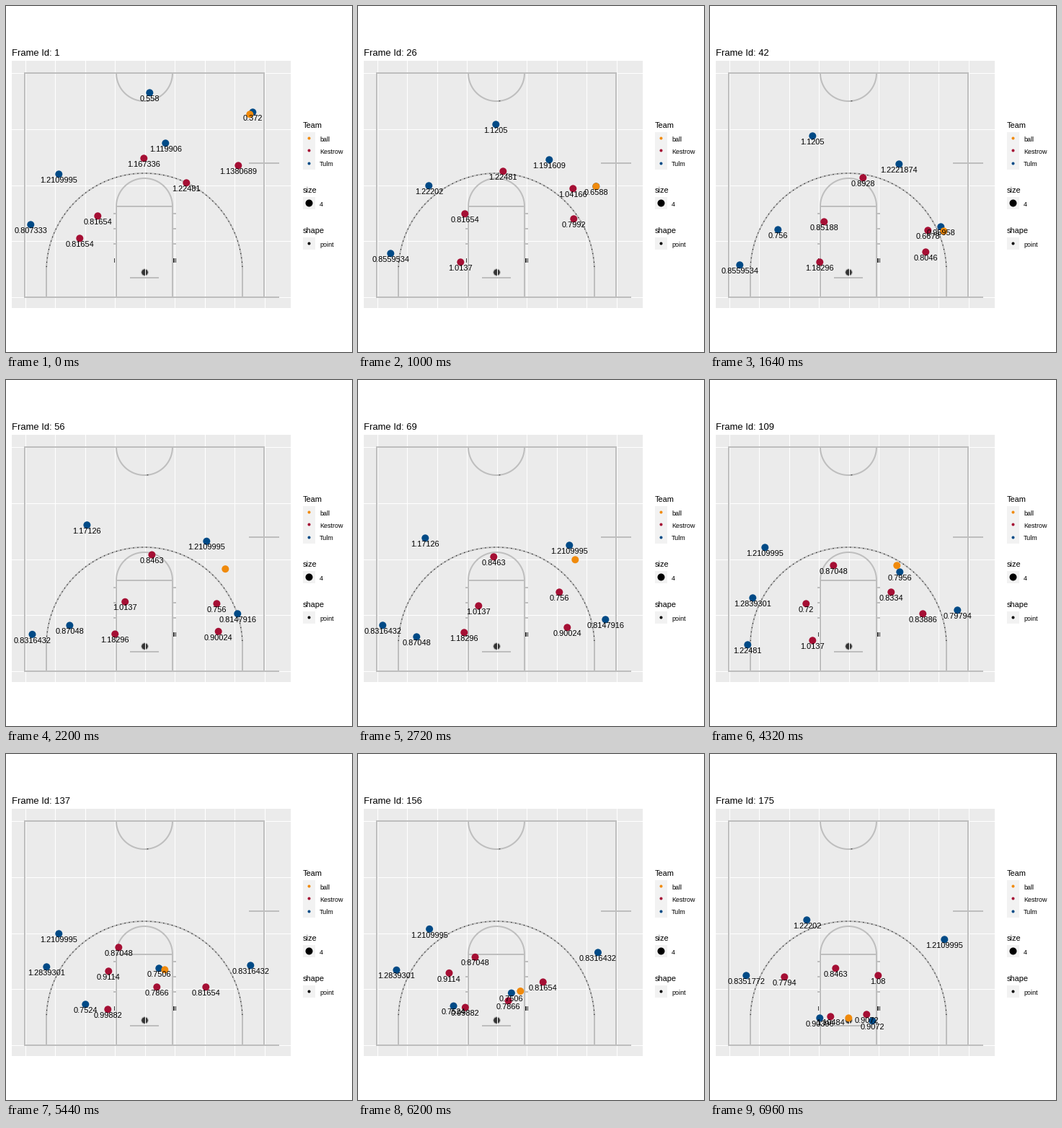
Animation, 480 px wide and 480 px high, one loop 7 s. Source, as a matplotlib script:

```python
import numpy as np
import matplotlib.pyplot as plt
from matplotlib.animation import FuncAnimation
from matplotlib.patches import Rectangle

plt.rcParams["font.family"] = "Liberation Sans"

SIZE, FRAMES, STEP_MS = 480, 175, 40
TIMES = (0, 25, 41, 68, 108, 136, 174)
ORANGE, CRIMSON, NAVY = "#F08A0C", "#A50F34", "#004A86"
PANEL, KEY, COURT, DARK = "#EBEBEB", "#F2F2F2", "#BEBEBE", "#333333"

fig = plt.figure(figsize=(SIZE / 72, SIZE / 72), dpi=72, facecolor="white")
ax = fig.add_axes([0, 0, 1, 1])
ax.set_xlim(0, SIZE)
ax.set_ylim(SIZE, 0)
ax.axis("off")


# ---- motion ----------------------------------------------------------

def smooth_path(points, extra):
    """Cubic Hermite path through timed points, one row per frame."""
    keys = dict(zip(TIMES, points)) | extra
    t = np.array(sorted(keys), float)
    p = np.array([keys[k] for k in sorted(keys)], float)
    m = np.gradient(p, t, axis=0)
    f = np.arange(FRAMES)
    i = np.clip(np.searchsorted(t, f, side="right") - 1, 0, len(t) - 2)
    h = (t[i + 1] - t[i])[:, None]
    u = (f - t[i])[:, None] / h
    return ((2 * u**3 - 3 * u**2 + 1) * p[i] + (u**3 - 2 * u**2 + u) * h * m[i]
            + (3 * u**2 - 2 * u**3) * p[i + 1] + (u**3 - u**2) * h * m[i + 1])


movers = []


def mover(color, values, points, extra=None):
    movers.append((color, values.split(), smooth_path(points, extra or {})))


mover(NAVY, "0.558 1.1205 1.1205 1.17126 1.2109995 1.2109995 1.22202",
      [(199, 120), (191, 164), (142, 180), (93, 219), (76, 232), (73, 249), (134, 230)])
mover(NAVY, "1.119906 1.191609 1.2221874 1.2109995 0.7956 0.7506 0.9072",
      [(221, 190), (265, 213), (262, 219), (293, 229), (263, 266), (212, 297), (225, 370)])
mover(NAVY, "0.372 0.6588 0.95958 0.8147916 0.79794 0.8316432 1.2109995",
      [(342, 147), (330, 250), (320, 306), (343, 332), (343, 319), (339, 293), (325, 257)],
      {54: (320, 323), 80: (346, 330)})
mover(NAVY, "1.2109995 1.22202 0.756 0.87048 1.22481 0.7524 0.90396",
      [(73, 233), (98, 249), (94, 310), (81, 356), (52, 367), (110, 347), (152, 366)],
      {118: (68, 364), 162: (139, 354)})
mover(NAVY, "0.807333 0.8559534 0.8559534 0.8316432 1.2839301 1.2839301 0.8351772",
      [(34, 303), (45, 343), (41, 359), (34, 340), (59, 302), (56, 295), (50, 307)],
      {90: (42, 325)})

mover(CRIMSON, "1.167336 1.22481 0.8928 0.8463 0.87048 0.87048 0.8463",
      [(191, 211), (201, 229), (212, 238), (188, 245), (171, 257), (156, 268), (174, 297)])
mover(CRIMSON, "1.1380689 1.04166 0.6678 0.756 0.8334 0.7866 0.9072",
      [(322, 221), (298, 253), (302, 311), (279, 294), (251, 294), (209, 323), (217, 361)])
mover(CRIMSON, "1.22481 0.7992 0.8046 0.90024 0.83886 0.81654 1.08",
      [(250, 245), (299, 295), (299, 341), (290, 343), (295, 324), (277, 323), (233, 307)])
mover(CRIMSON, "0.81654 0.81654 0.85188 1.0137 0.72 0.9114 0.7794",
      [(127, 291), (148, 288), (158, 299), (167, 313), (133, 310), (142, 301), (103, 309)])
mover(CRIMSON, "0.81654 1.0137 1.18296 1.18296 1.0137 0.99882 1.10484",
      [(102, 322), (142, 355), (152, 355), (147, 350), (142, 361), (141, 354), (167, 364)],
      {122: (141, 363), 162: (154, 354)})

mover(ORANGE, "",
      [(338, 150), (330, 250), (324, 312), (301, 249), (259, 257), (220, 299), (192, 366)],
      {48: (322, 308), 58: (298, 246), 164: (218, 345)})


# ---- court -----------------------------------------------------------

def line(xs, ys, color=COURT, lw=2, **kw):
    ax.plot(xs, ys, color=color, lw=lw, solid_capstyle="butt", **kw)


def straight(x0, y0, x1, y1, **kw):
    line([x0, x1], [y0, y1], antialiased=False, **kw)


def arc(cx, cy, r, start, end, **kw):
    a = np.radians(np.linspace(start, end, 120))
    line(cx + r * np.cos(a), cy + r * np.sin(a), **kw)


def box(x, y, w, h, color):
    ax.add_patch(Rectangle((x, y), w, h, fc=color, lw=0, antialiased=False))


def dot(x, y, r, color, **kw):
    ax.scatter([x], [y], s=4 * r * r, c=color, **({"linewidths": 0} | kw))


def text(x, y, s, size=11, **kw):
    return ax.text(x, y, s, fontsize=size, color="black", va="baseline", **kw)


box(8, 76, 387, 343, PANEL)
for k in range(9):
    x = int(26 + 41.5 * k) + 0.5
    straight(x, 76, x, 419, color="white", lw=1)
for k in range(5):
    y = int(92.5 + 77.75 * k) + 0.5
    straight(8, y, 395, y, color="white", lw=1)

straight(25, 93, 359, 93)
straight(25, 404, 379, 404)
straight(26, 93, 26, 404)
straight(358, 93, 358, 404)
straight(337, 218, 379, 218)
for x in (56, 328):
    straight(x, 362, x, 404)
for x in (153, 231):
    straight(x, 278, x, 404)
straight(152, 278, 232, 278)
straight(172, 377, 212, 377)
arc(192, 93, 39, 0, 180)
arc(192, 278, 39, 180, 360)
arc(192, 368, 136, 182.5, 357.5)
arc(192, 368, 136, 182.5, 357.5, color="black", lw=1, linestyle=(0, (1.3, 4.7)))
arc(192, 93, 39, 82, 85, color=DARK, lw=1)
for y in (288, 309, 330):
    straight(149, y, 153, y)
    straight(232, y, 236, y)
box(150, 350, 3, 6, DARK)
box(232, 350, 4, 6, DARK)
dot(192, 368.5, 4.8, DARK, edgecolors=COURT, linewidths=1)


# ---- legend ----------------------------------------------------------

def legend(y, title, entries):
    text(412, y, title)
    for k, (label, color, r) in enumerate(entries):
        cy = y + 14.5 + 17.3 * k
        box(412, cy - 8.6, 17, 17.3, KEY)
        dot(420.3, cy - 0.5, r, color)
        text(435, cy + 4, label, 9)


legend(169, "Team", [("ball", ORANGE, 2), ("Kestrow", CRIMSON, 2), ("Tulm", NAVY, 2)])
legend(259, "size", [("4", "black", 5)])
legend(315, "shape", [("point", "black", 2)])


# ---- animation -------------------------------------------------------

title = text(8, 69, "", 13)
dots = ax.scatter([0] * len(movers), [0] * len(movers), s=100, linewidths=0,
                  c=[m[0] for m in movers], zorder=4)
labels = [text(0, 0, "", ha="center", zorder=5) for m in movers if m[1]]


def update(f):
    title.set_text(f"Frame Id: {f + 1}")
    dots.set_offsets([path[f] + 0.3 for _, _, path in movers])
    nearest = int(np.argmin(np.abs(np.array(TIMES) - f)))
    for label, (_, values, path) in zip(labels, movers):
        x, y = path[f]
        label.set_position((x + 0.3, y + 12))
        label.set_text(values[nearest])
    return [title, dots, *labels]


anim = FuncAnimation(fig, update, frames=FRAMES, interval=STEP_MS,
                     repeat=True, repeat_delay=0, blit=False)
plt.show()
```
